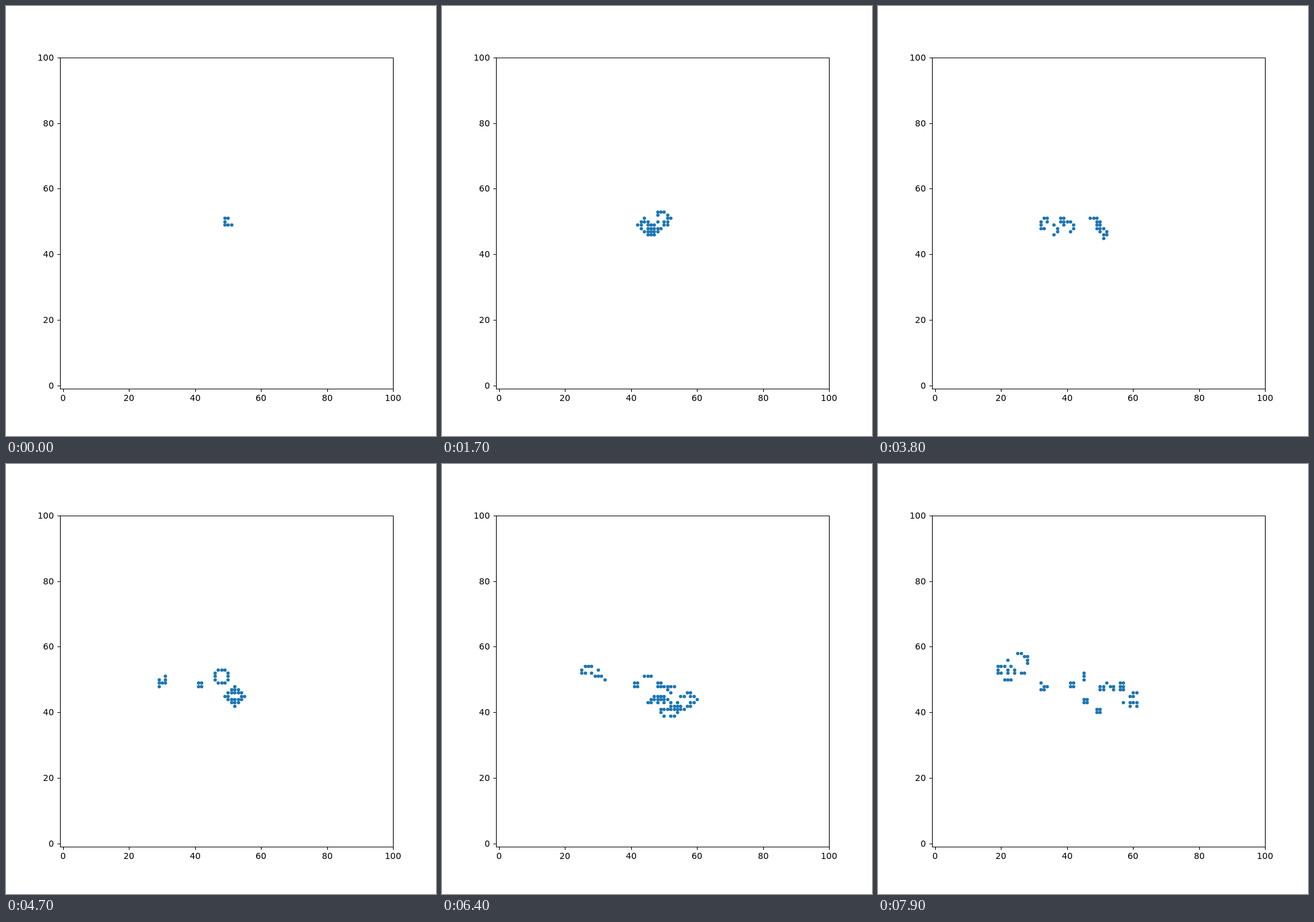
These frames come from a looping animation (700 px wide and 700 px high, 8 s). An HTML page:

```html
<!DOCTYPE html>
<html lang="en">
<head>
<meta charset="utf-8">
<title>Game of Life plot</title>
<style>
  html, body { margin: 0; width: 100%; height: 100%; overflow: hidden; background: #fff; }
  svg { display: block; width: 700px; height: 700px; }
  #axes { fill: none; stroke: #000; stroke-width: 1.11; }
  #cells { fill: none; stroke: #1f77b4; stroke-width: 5.56; stroke-linecap: round; }
  text { font: 13.89px "DejaVu Sans", Verdana, sans-serif; fill: #000; }
</style>
</head>
<body>
<svg viewBox="0 0 700 700">
  <path id="cells"/>
  <path id="axes"/>
  <g id="labels"></g>
</svg>
<script>
const STEP = 100, COUNT = 80, SIZE = 101;
const $ = id => document.getElementById(id);

// Data coordinates to pixel centres; both axes run from -1 to 100.
const snap = v => Math.floor(v + 0.5) + 0.5;
const px = x => snap(87.5 + (x + 1) * 542.5 / SIZE);
const py = y => snap(623 - (y + 1) * 539 / SIZE);

function addLabel(value, x, y, anchor) {
  const t = document.createElementNS("http://www.w3.org/2000/svg", "text");
  t.setAttribute("x", x);
  t.setAttribute("y", y);
  t.setAttribute("text-anchor", anchor);
  t.textContent = value;
  $("labels").append(t);
}

function drawAxes() {
  let d = "M88.5 84.5H630.5V623.5H88.5Z";
  for (let v = 0; v <= 100; v += 20) {
    d += `M${px(v)} 623.5v4.86M88.5 ${py(v)}h-4.86`;
    addLabel(v, px(v) - 0.5, 643, "middle");
    addLabel(v, 78, py(v) + 4.5, "end");
  }
  $("axes").setAttribute("d", d);
}

// A cell is stored as the key x * SIZE + y.
function nextGeneration(cells) {
  const neighbours = new Map();
  for (const key of cells)
    for (const dx of [-SIZE, 0, SIZE])
      for (const dy of [-1, 0, 1])
        if (dx || dy) {
          const k = key + dx + dy;
          neighbours.set(k, (neighbours.get(k) || 0) + 1);
        }
  const next = new Set();
  for (const [k, n] of neighbours)
    if (n === 3 || (n === 2 && cells.has(k))) next.add(k);
  return next;
}

const toPath = cells => [...cells]
  .map(k => `M${px(Math.floor(k / SIZE))} ${py(k % SIZE)}h0.001`).join("");

const seed = [[49, 51], [50, 51], [49, 50], [49, 49], [50, 49], [51, 49]];
let cells = new Set(seed.map(([x, y]) => x * SIZE + y));
const paths = [];
for (let i = 0; i < COUNT; i++) {
  paths.push(toPath(cells));
  cells = nextGeneration(cells);
}

const start = performance.now();
let shown = -1;

function draw() {
  const i = Math.floor((performance.now() - start) / STEP) % COUNT;
  if (i !== shown) $("cells").setAttribute("d", paths[shown = i]);
  requestAnimationFrame(draw);
}

drawAxes();
draw();
</script>
</body>
</html>
```
